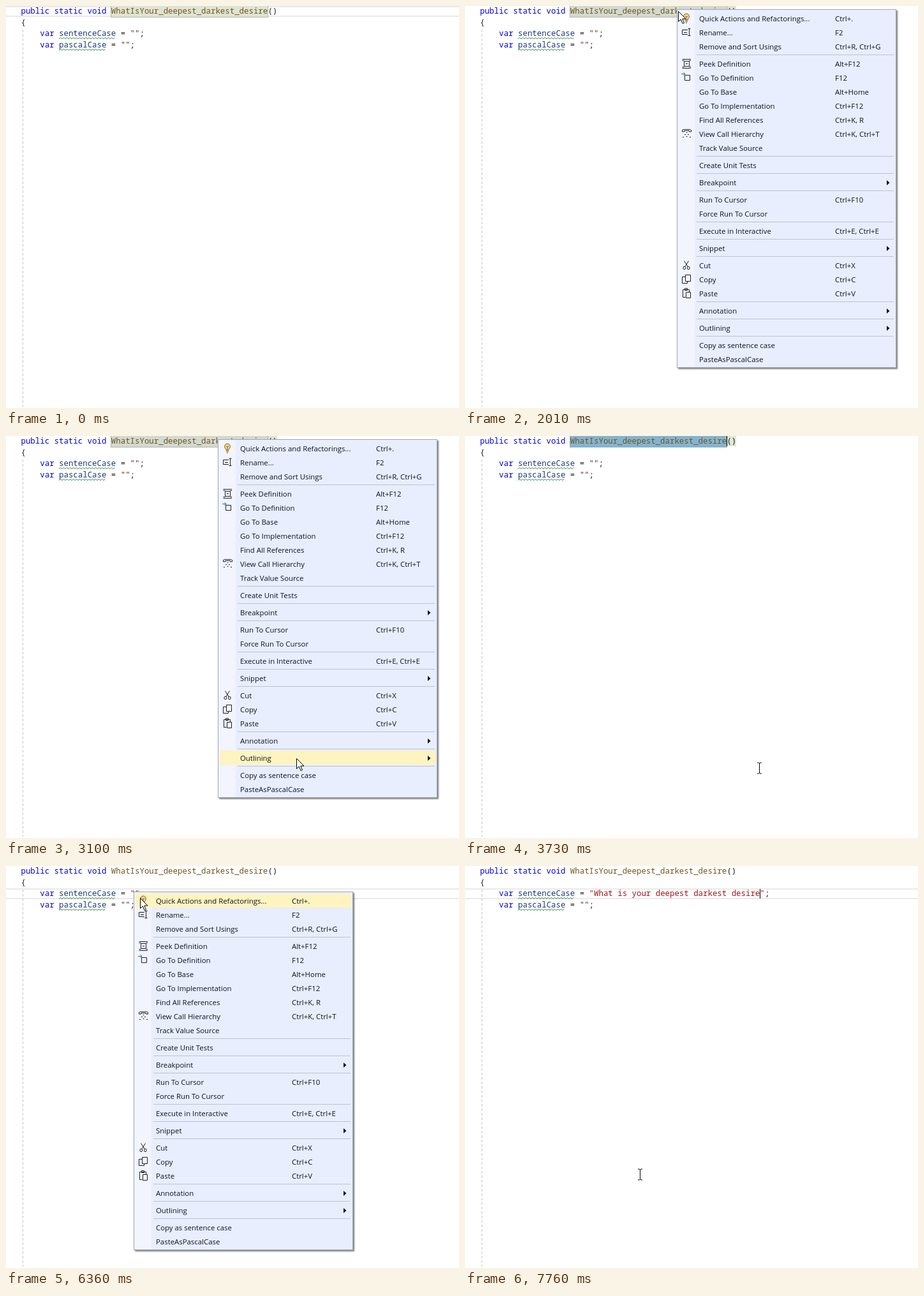
Recreate the animation shown at these times as an HTML page with a canvas. Size 710 px wide and 630 px high, loop 8000 ms.

```html
<!DOCTYPE html>
<html lang="en">
<head>
<meta charset="utf-8">
<title>Editor context menu</title>
<style>
  html, body { margin: 0; width: 710px; height: 630px; overflow: hidden; background: #fff; }
  canvas { display: block; }
</style>
</head>
<body>
<canvas id="stage" width="710" height="630"></canvas>
<script>
const g = document.getElementById('stage').getContext('2d');
const LOOP = 8000, START = 140, TICK = 155.5;
const CODE_FONT = '12.4px "Noto Sans Mono", monospace';
const MENU_FONT = '11.4px "Open Sans", sans-serif';
const LEFT = 23.5, CHAR = 7.44, ROW = 22, GAP = 5;
const KEY = '#0000e6', NAME = '#74531f', VAR = '#1f377f', STR = '#a31515', INK = '#1e1e1e';
const MENU_INK = '#0c1222';

// label | shortcut | icon; '>' marks a submenu, '-' a separator
const ITEMS = `Quick Actions and Refactorings...|Ctrl+.|bulb
Rename...|F2|rename
Remove and Sort Usings|Ctrl+R, Ctrl+G
-
Peek Definition|Alt+F12|peek
Go To Definition|F12|goTo
Go To Base|Alt+Home
Go To Implementation|Ctrl+F12
Find All References|Ctrl+K, R
View Call Hierarchy|Ctrl+K, Ctrl+T|calls
Track Value Source
-
Create Unit Tests
-
Breakpoint|>
-
Run To Cursor|Ctrl+F10
Force Run To Cursor
-
Execute in Interactive|Ctrl+E, Ctrl+E
-
Snippet|>
-
Cut|Ctrl+X|cut
Copy|Ctrl+C|copy
Paste|Ctrl+V|paste
-
Annotation|>
-
Outlining|>
-
Copy as sentence case
PasteAsPascalCase`.split('\n').map(s => s.split('|'));

const ICONS = {
  bulb: 'M-2 3.5V2C-6-1-4.5-7 0-7S6-1 2 2V3.5ZM-2 5.5H2M-1 7.5H1M0 3V-2L-2-3M0-2L2-3',
  rename: 'M2-3.5H-6.5V3.5H2M-4 .5H1M2.5-5.5H6.5M2.5 5.5H6.5M4.5-5.5V5.5',
  peek: 'M-6.5-6.5H7M-6.5 7.5H7M-3.5-3.5H4.5V4.5H-3.5ZM-1 .5H2M-6.5-4.5H-3.5M7-4.5H4.5M-6.5 5.5H-3.5M7 5.5H4.5',
  goTo: 'M-2.5-3.5H5.5V4.5H-2.5Z',
  calls: 'M-6.5-3V-5.5L-4.5-6.5H5.5L7.5-5.5V-3H4.5V-4.5H-3.5V-3ZM-.5-1.5H1.5M-3 1.5H-1M2 1.5H4M-6 5.5H-4M-.5 4.5H1.5M5 5.5H7',
  cut: 'M-3.5-6.5L2.5 3M3.5-6.5L-2.5 3M-1.5 4.5A1.8 1.8 0 1 1-5 4.5A1.8 1.8 0 1 1-1.5 4.5M5 4.5A1.8 1.8 0 1 1 1.5 4.5A1.8 1.8 0 1 1 5 4.5',
  copy: 'M-1.5-6.5H6.5V3.5H-1.5ZM-1.5-3.5H-6.5V6.5H1.5V3.5',
  paste: 'M-1.5 6.5H-5.5V-5.5H4.5V-2M-2.5-7.5H1.5V-4.5H-2.5ZM-.5-1.5H6.5V7.5H-.5Z'
};
const ARROW = new Path2D('M0 0V16L3.8 12.4L6.6 19L9 18L6.3 11.6H11.5Z');
const BEAM = new Path2D('M-3.5-8.5H-1L0-7.5L1-8.5H3.5M0-7.5V7.5M-3.5 8.5H-1L0 7.5L1 8.5H3.5');

// pointer path: tick, x, y
const PATH = [
  [0, 642, 541], [1, 590, 400], [2, 490, 230], [3, 400, 90], [4, 345, 20], [5, 334, 7],
  [12, 334, 8], [15, 371, 90], [16, 400, 210], [17, 430, 390], [18, 448, 474], [19, 455, 505],
  [20, 461, 532], [21, 461, 532], [22, 461, 520], [23, 461, 520],
  [24, 440, 480], [26, 290, 185], [27, 225, 72], [28, 204, 43], [29, 201, 41],
  [36, 201, 41], [41, 212, 52], [42, 222, 80], [43, 262, 290], [44, 279, 438],
  [45, 280, 455], [47, 275, 488], [48, 274, 484], [49, 274, 483], [99, 274, 483]
];

const within = (v, a, b) => v >= a && v < b;

function pointerAt(k) {
  const i = PATH.findIndex(p => p[0] > k);
  const [a, b] = [PATH[i - 1], PATH[i]];
  const f = (k - a[0]) / (b[0] - a[0]);
  return [a[1] + (b[1] - a[1]) * f, a[2] + (b[2] - a[2]) * f];
}

function box(x, y, w, h, fill) {
  g.fillStyle = fill;
  g.fillRect(x, y, w, h);
}

function text(s, x, y, color) {
  g.fillStyle = color;
  g.fillText(s, x, y);
}

// pairs of token and colour, starting at a column
function code(y, col, ...parts) {
  for (let i = 0; i < parts.length; i += 2) {
    text(parts[i], LEFT + col * CHAR, y, parts[i + 1]);
    col += parts[i].length;
  }
}

function squiggle(x, end, y) {
  g.beginPath();
  for (let i = 0; x + i * 2.5 <= end; i++) g.lineTo(x + i * 2.5, y + (i % 2 ? -1 : 1));
  g.strokeStyle = '#3c873c';
  g.lineWidth = 1;
  g.stroke();
}

function lineFrame(y) {
  g.strokeStyle = '#eaeaea';
  g.lineWidth = 2;
  g.strokeRect(-2, y, 714, 15);
}

function editor(k) {
  const selected = within(k, 8, 32), menuOpen = within(k, 12, 22), pasted = k >= 49;
  if (k < 8) lineFrame(1);
  if (k >= 32) lineFrame(36);
  if (k < 32) {
    box(164, -1, 247, 18, !selected ? '#dfe4d2' : menuOpen ? '#d2dacf' : '#84b4d0');
    g.strokeStyle = selected && !menuOpen ? '#84b4d0' : '#b3b6ad';
    g.lineWidth = 1;
    g.strokeRect(164.5, -.5, 246, 18);
  }
  if (selected) box(411, 0, 14, 16, '#e0e6d4');
  if (within(k, 32, 36)) box(195, 37, 15, 14, '#e3e5d8');

  g.strokeStyle = '#c6c6c6';
  g.lineWidth = 1;
  g.setLineDash([4, 3]);
  g.beginPath();
  g.moveTo(26.5, 37);
  g.lineTo(26.5, 628);
  g.stroke();
  g.setLineDash([]);

  g.font = CODE_FONT;
  code(12, 0, 'public static void ', KEY, 'WhatIsYour_deepest_darkest_desire', NAME, '()', INK);
  code(30, 0, '{', INK);
  const value = pasted ? 'What is your deepest darkest desire' : '';
  const quotes = k < 32 ? '#5a2a20' : STR;
  code(47, 4, 'var ', KEY, 'sentenceCase', VAR, ' = ', INK, `"${value}"`, quotes, ';', INK);
  code(65, 4, 'var ', KEY, 'pascalCase', VAR, ' = ', INK, '""', '#5a2a20', ';', INK);
  squiggle(83, 172, 50.5);
  squiggle(83, 157, 68.5);

  if (k === 7) box(328, 0, 1, 16, '#000');
  if (within(k, 8, 12) || within(k, 22, 26) || within(k, 29, 32)) box(410, 0, 1, 16, '#000');
  if (within(k, 32, 35)) box(202, 36, 1, 15, '#000');
  if (pasted) box(462, 36, 1, 15, '#000');
}

function icon(name, x, y) {
  const shape = new Path2D(ICONS[name]);
  g.save();
  g.translate(x, y);
  g.lineWidth = 1;
  g.strokeStyle = name === 'bulb' ? '#806020' : '#1c1f26';
  if (name === 'bulb') {
    g.fillStyle = '#f5d68c';
    g.fill(shape);
  }
  g.stroke(shape);
  if (name === 'goTo') {
    g.strokeStyle = '#1270b8';
    g.stroke(new Path2D('M-8-5.5H-2M-4.5-8L-2-5.5L-4.5-3'));
  }
  g.restore();
}

function menu(x, y, px, py) {
  g.save();
  g.shadowColor = 'rgba(0,0,0,.5)';
  g.shadowBlur = 2;
  g.shadowOffsetX = g.shadowOffsetY = 2;
  box(x, y, 344, 562, '#9ba7b7');
  g.restore();
  box(x + 1, y + 1, 342, 560, '#e9eeff');
  box(x + 1, y + 1, 27, 560, '#f2f4fe');
  g.font = MENU_FONT;
  let top = y + 3;
  for (const [label, extra, name] of ITEMS) {
    if (label === '-') {
      box(x + 31, top + 2, 309, 1, '#bec3d0');
      top += GAP;
      continue;
    }
    const mid = top + ROW / 2;
    if (within(px, x + 3, x + 341) && within(py, top, top + ROW)) {
      box(x + 3, top, 338, ROW, '#fdf4bf');
    }
    text(label, x + 35, mid + 5, MENU_INK);
    if (extra === '>') {
      g.fill(new Path2D(`M${x + 329} ${mid - 3}l4.5 4l-4.5 4z`));
    } else if (extra) {
      text(extra, x + 248, mid + 5, MENU_INK);
    }
    if (name) icon(name, x + 15, mid);
    top += ROW;
  }
}

function pointer(x, y, arrow) {
  g.save();
  g.translate(Math.round(x) + .5, Math.round(y) + .5);
  g.lineWidth = 1;
  g.strokeStyle = '#000';
  if (arrow) {
    g.fillStyle = '#fff';
    g.fill(ARROW);
    g.stroke(ARROW);
  } else {
    g.stroke(BEAM);
  }
  g.restore();
}

function draw(now) {
  const t = now % LOOP;
  const k = Math.floor((t - START) / TICK + .05);
  box(0, 0, 710, 630, '#fff');
  editor(k);
  if (k >= 0) {
    const [x, y] = pointerAt(k);
    const first = within(k, 12, 22), second = within(k, 36, 49);
    if (first) menu(332, 5, x, y);
    if (second) menu(200, 40, x, y);
    pointer(x, y, first || second);
  }
}

const begin = performance.now();
function loop() {
  draw(performance.now() - begin);
  requestAnimationFrame(loop);
}
loop();
</script>
</body>
</html>
```
